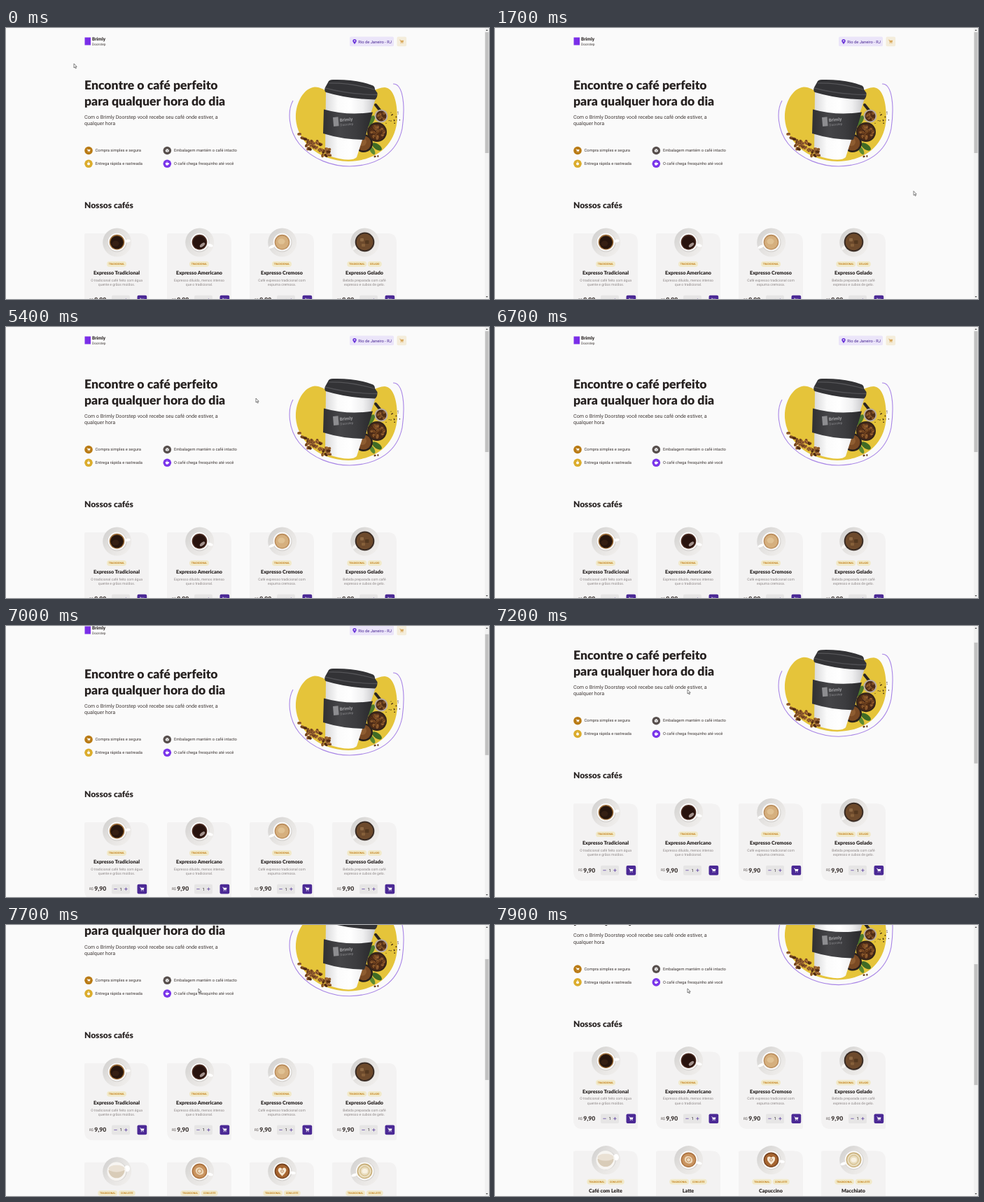
Recreate the animation shown at these times as an HTML page. Size 690 px wide and 388 px high, loop 8000 ms.

```html
<!DOCTYPE html>
<html lang="pt-BR">
<head>
<meta charset="utf-8">
<title>Cafés</title>
<style>
  html, body { margin: 0; width: 100%; height: 100%; overflow: hidden; background: #fafafa; }
  svg { display: block; width: 690px; height: 388px; text-rendering: geometricPrecision; }
  text { font-family: Roboto, sans-serif; }
  .display { font-family: Lato, sans-serif; font-weight: 900; }
  .bold { font-weight: 700; }
  .middle { text-anchor: middle; }
</style>
</head>
<body>
<svg id="stage" viewBox="0 0 690 388"></svg>
<script>
const INK = '#272221', BODY = '#403937', MUTED = '#8d8686',
      DEEP = '#4b2995', GOLD = '#c47f17', SAND = '#f1e9c9', YELLOW = '#e5c43a';

const text = (x, y, size, fill, value, cls = '') =>
  `<text x="${x}" y="${y}" font-size="${size}" fill="${fill}" class="${cls}">${value}</text>`;
const rect = (x, y, w, h, fill, r = 0) =>
  `<rect x="${x}" y="${y}" width="${w}" height="${h}" rx="${r}" fill="${fill}"/>`;
const circle = (x, y, r, fill, extra = '') =>
  `<circle cx="${x}" cy="${y}" r="${r}" fill="${fill}" ${extra}/>`;
const ellipse = (x, y, rx, ry, fill, angle = 0) =>
  `<ellipse rx="${rx}" ry="${ry}" fill="${fill}" transform="translate(${x} ${y}) rotate(${angle})"/>`;
const path = (d, fill, extra = '') => `<path d="${d}" fill="${fill}" ${extra}/>`;
const at = (x, y, content, more = '') => `<g transform="translate(${x} ${y}) ${more}">${content}</g>`;
const gradient = (id, slope, ...colors) =>
  `<linearGradient id="${id}" y2="${slope}">${colors.map((c, i) =>
    `<stop offset="${i / (colors.length - 1)}" stop-color="${c}"/>`).join('')}</linearGradient>`;

let seed = 7;
const random = () => (seed = seed * 16807 % 2147483647) / 2147483647;
const between = (a, b) => a + (b - a) * random();

const cart = (x, y, scale, fill) => at(x, y,
  path('M-3.2-2.8h1.3l.3 1h4.8l-.9 3h-3.6l-1-3.3h-.9z', fill) +
  circle(-1, 2.3, .6, fill) + circle(1.7, 2.3, .6, fill), `scale(${scale})`);

function header() {
  return rect(112.5, 13.5, 8.5, 11, '#7a2ee8') +
    text(123, 18, 6.6, INK, 'Brimly', 'bold') +
    text(123, 24.7, 4.8, BODY, 'Doorstep') +
    rect(491, 12.5, 63, 13.8, '#ebe5f9', 2) +
    path('M498 23.2C496 20.8 495.3 19.8 495.3 18.6a2.7 2.7 0 0 1 5.4 0c0 1.2-.7 2.2-2.7 4.6z', '#6b35d9') +
    circle(498, 18.6, 1, '#ebe5f9') +
    text(503.3, 21.6, 5.75, DEEP, 'Rio de Janeiro - RJ') +
    rect(558.5, 12.5, 13.6, 13.8, '#f4eddb', 2) + cart(565.2, 19.5, .95, '#d9a95c');
}

function benefits() {
  const glyphs = {
    cart: cart(0, 0, .8, '#fff'),
    timer: circle(0, .3, 2, '#fff') + rect(-.8, -2.8, 1.6, .7, '#fff'),
    box: path('M0-2.6L2.4-1.3V1.3L0 2.6-2.4 1.3V-1.3z', '#fff') +
      path('M-2.2-1.2L0 0 2.2-1.2M0 0v2.4', 'none', 'stroke="#574f4d" stroke-width=".5"'),
    mug: path('M-2.4-1.2h4.2v.5h1v1.6h-1.2q-.6 1.5-2 1.5t-2-2z', '#fff') + rect(-1.2, -2.6, 2, .7, '#fff')
  };
  return [
    [118, 175.5, '#b97a14', 'cart', 'Compra simples e segura'],
    [118, 194.3, '#dbac2c', 'timer', 'Entrega rápida e rastreada'],
    [230.3, 175.5, '#574f4d', 'box', 'Embalagem mantém o café intacto'],
    [230.3, 194.3, '#7a35ea', 'mug', 'O café chega fresquinho até você']
  ].map(([x, y, fill, glyph, label]) =>
    circle(x, y, 5.8, fill) + at(x, y, glyphs[glyph]) + text(x + 9.6, y + 1.8, 5.78, BODY, label)).join('');
}

function bean(x, y, size) {
  const fill = ['#5f3518', '#8a5428', '#a96f38'][Math.floor(random() * 3)];
  return at(x, y, ellipse(0, 0, size, size * .7, fill) +
    path(`M${-size * .8} 0Q0 ${size * .4} ${size * .8} 0`, 'none', 'stroke="#2e180b" stroke-width=".6"'),
    `rotate(${between(0, 180)})`);
}

function beansAround(x, y, rx, ry, count, size) {
  let out = '';
  for (let i = 0; i < count; i++) {
    const a = between(0, 2 * Math.PI), r = Math.sqrt(random());
    out += bean(x + rx * r * Math.cos(a), y + ry * r * Math.sin(a), size);
  }
  return out;
}

function hero() {
  let out = gradient('paper', 0, '#d9d9da', '#fbfbfb', '#fff', '#f0f0f1', '#c6c6c9') +
    gradient('sleeve', 0, '#303033', '#454548', '#3c3c3f', '#29292b');
  out += path('M410 104C402 118 403 146 419 166C438 189 467 198 491 198C532 197 559 178 566 144C570 116 568 93 561 84Q558 80 553 80',
    'none', 'stroke="#a885e6" stroke-width="1.1"');
  out += path('M414 130C413 108 425 86 441 84.5C456 84 468 102 490 104C508 104 522 86 541 85C554 86 559 106 559 129C557 166 532 190 489 191C443 190 416 160 414 130z', YELLOW);
  for (let i = 0; i < 14; i++) out += circle(between(543, 564), between(118, 138), between(.4, .9), '#3b2415');
  out += beansAround(529, 183, 5, 3, 3, 1.5);
  // leaves, spoon and bowls
  out += ellipse(521, 133, 9, 4, '#4d7a2c', -55) + ellipse(530, 170, 8, 4, '#3f6b25', 35) +
    ellipse(523, 175, 7, 3, '#5b8a33', 60) +
    path('M528 110L540 125', 'none', 'stroke="#2b2523" stroke-width="4" stroke-linecap="round"') +
    circle(536, 126, 9.5, '#b8aca2') + circle(536, 126, 7.5, '#4c2b18') + beansAround(536, 126, 6, 6, 14, 2) +
    circle(511, 165, 13, '#2b211c') + circle(511, 165, 10.5, '#7a4a24') + circle(509, 163, 6, '#8f5d31') +
    circle(530, 149, 14, '#33241b') + circle(530, 149, 12, '#4a2a18') + beansAround(530, 149, 10, 10, 30, 2.4);
  // cup
  out += path('M457 91L456 178Q457 183 476 187T501 185L528 101z', 'url(#paper)') +
    path('M454 116.5Q488 126 524 120.5L512 160Q482 160 453 151z', 'url(#sleeve)') +
    path('M460 78Q461 74 467 74Q498 73 523 82Q527 83 527 88L530.5 93Q531 100 527 102.5Q490 102 457 92Q454 90 456 85z', '#333336') +
    path('M461 79Q490 78 526 88', 'none', 'stroke="#555558" stroke-width="1.2"') +
    path('M456 86Q490 95 530 95.5', 'none', 'stroke="#505054" stroke-width="1.3"');
  out += at(467, 128, rect(0, 0, 7.5, 13, '#8d8d90') +
    text(9.5, 7, 6.3, '#a4a4a7', 'Brimly', 'bold') + text(9.5, 13.3, 4.6, '#8d8d90', 'Doorstep'), 'rotate(-5)');
  // loose beans in front of the cup
  for (let i = 0; i < 9; i++) out += bean(420 + i * 4 + between(-1, 1), 153 + i * 2.8 + between(-2, 2), 3);
  return out + beansAround(438, 168, 12, 6, 16, 3) + beansAround(456, 178, 9, 6, 14, 3);
}

function tags(cx, y, labels) {
  const widths = { TRADICIONAL: 28, GELADO: 20, 'COM LEITE': 24 };
  let x = cx - (labels.reduce((sum, l) => sum + widths[l], 0) + 1.5 * (labels.length - 1)) / 2;
  return labels.map(label => {
    const w = widths[label];
    const tag = rect(x, y - 3.9, w, 7.8, SAND, 3.9) + text(x + w / 2, y + 1.3, 3.5, GOLD, label, 'bold middle');
    x += w + 1.5;
    return tag;
  }).join('');
}

const plate = circle(.7, 0, 20.5, 'url(#china)') + circle(.7, 0, 13.8, '#d3d1cf');

function cupOf(handleX, handleY, rim, coffee, cream) {
  return plate + ellipse(handleX, handleY, 4.8, 2, '#fff', Math.atan2(handleY, handleX) * 180 / Math.PI) +
    at(.5, -.4, circle(0, 0, 13, '#f9f8f7') + circle(0, 0, 10.8, rim) + circle(0, .2, 9.4, coffee) + cream);
}

const ring = (r, stroke, width) => circle(0, 0, r, 'none', `stroke="${stroke}" stroke-width="${width}"`);
const coffees = [
  ['Expresso Tradicional', ['O tradicional café feito com água', 'quente e grãos moídos.'], ['TRADICIONAL'],
    cupOf(15, -2, '#9a6a35', '#26150d', ellipse(-2, 2, 5, 4, '#351f13'))],
  ['Expresso Americano', ['Expresso diluído, menos intenso', 'que o tradicional.'], ['TRADICIONAL'],
    cupOf(15, 4, '#4a2a20', '#28130e', ellipse(4, 4, 4.4, 2.2, '#a3928d', -40))],
  ['Expresso Cremoso', ['Café expresso tradicional com', 'espuma cremosa.'], ['TRADICIONAL'],
    cupOf(-14, 6, '#b98b5a', '#d5af7e', ellipse(-1, -1, 5, 4, '#e0c193'))],
  ['Expresso Gelado', ['Bebida preparada com café', 'expresso e cubos de gelo.'], ['TRADICIONAL', 'GELADO'],
    plate + ellipse(-13, 7, 5, 2.3, '#f7f5f3', -40) +
    circle(.5, -.6, 13.8, '#3a2c24') + circle(.5, -.6, 11.8, '#6d4a2c') +
    rect(-6, -6, 5, 4.5, '#8f6a45', 1) + rect(1, -3, 5.5, 5, '#54381f', 1) + rect(-4, 2, 5, 4, '#86603a', 1)],
  ['Café com Leite', [], ['TRADICIONAL', 'COM LEITE'],
    plate + ellipse(15, -4, 4, 4.5, '#fff') + circle(0, 0, 13.5, '#f7f5f2') +
    path('M-11.5-2Q0 2 11.5-2A11.5 11.5 0 0 1-11.5-2z', '#d9ccb8') + ellipse(0, -4, 11.5, 5, '#eae1d4')],
  ['Latte', [], ['TRADICIONAL', 'COM LEITE'],
    cupOf(15, 4, '#a96f3b', '#c99460', ellipse(0, 0, 6, 5, '#eed9bb', 30) + ring(3, '#c08b55', 1))],
  ['Capuccino', [], ['TRADICIONAL', 'COM LEITE'],
    cupOf(15, 2, '#74401d', '#a66531', path('M0 7Q-8 0-5-4-2-6 0-3 2-6 5-4 8 0 0 7z', '#f5e7d2') + ring(1.8, '#a66531', .8))],
  ['Macchiato', [], ['TRADICIONAL', 'COM LEITE'],
    cupOf(-14, 5, '#c5aa72', '#e9ddbf', ring(6.5, '#d0b67e', 1) + ellipse(0, 0, 4, 3.3, '#f8f1e1'))]
];

function card([name, lines, labels, cup], index) {
  const x = 112 + index % 4 * 118, y = 294 + Math.floor(index / 4) * 142;
  return at(x, y,
    path('M2 0H79Q92 0 92 13V108Q92 110.5 90 110.5H13Q0 110.5 0 97V2Q0 0 2 0z', '#f3f2f2') +
    at(46, 13, cup) + tags(46, 44, labels) +
    text(46, 59.2, 7.2, INK, name, 'display middle') +
    lines.map((line, i) => text(46, 68.8 + i * 6.4, 5.03, MUTED, line, 'middle')).join('') +
    text(7, 97.3, 5.03, '#574f4d', 'R$') + text(14.2, 98.4, 8.6, BODY, '9,90', 'display') +
    rect(39, 88.8, 26, 13.7, '#e6e5e5', 2) +
    path('M42.3 95.6h4.4M57.2 95.6h4.4M59.4 93.4v4.4', 'none', `stroke="${DEEP}" stroke-width=".7"`) +
    text(52, 97.7, 5.75, INK, '1', 'middle') +
    rect(75.5, 88.8, 13.7, 13.7, DEEP, 2) + cart(82.3, 95.6, 1, '#fff'));
}

const page = gradient('china', .8, '#cfcecd', '#e4e2e0', '#f0eeec') + header() +
  text(112, 88.2, 17.6, INK, 'Encontre o café perfeito', 'display') +
  text(112, 110.5, 17.6, INK, 'para qualquer hora do dia', 'display') +
  text(112, 129.8, 7.19, BODY, 'Com o Brimly Doorstep você recebe seu café onde estiver, a') +
  text(112, 139.1, 7.19, BODY, 'qualquer hora') +
  benefits() + hero() +
  text(112, 258.2, 12, INK, 'Nossos cafés', 'display') +
  coffees.map(card).join('');

const stage = document.getElementById('stage');
stage.innerHTML = rect(0, 0, 690, 388, '#fafafa') + `<g id="page">${page}</g>` +
  rect(684, 0, 6, 388, '#f1f1f1') +
  path('M685.5 4l1.5-2 1.5 2zM685.5 384l1.5 2 1.5-2z', '#505050') +
  `<g id="thumb">${rect(684.5, 6, 5, 173, '#c1c1c1')}</g>` +
  `<g id="cursor">${path('M0 0V6L1.4 4.8 2.4 7 3.4 6.5 2.4 4.4H4.2z', '#fff', 'stroke="#222" stroke-width=".55"')}</g>`;
const [pageLayer, thumb, cursor] = ['page', 'thumb', 'cursor'].map(id => document.getElementById(id));

// Each key: time, then the values reached at that time
const cursorKeys = [
  [600, 97, 51], [800, 150, 74], [1100, 360, 150], [1400, 560, 212], [1500, 587, 224],
  [1700, 598, 233.5], [2200, 602, 245], [3600, 602, 245], [3700, 646, 124.3], [4500, 646, 124.3],
  [4800, 550, 45], [5000, 420, 8], [5200, 325, 45], [5400, 357, 102], [6400, 357, 102], [6700, 275, 91]
];
const scrollKeys = [[6900, 0], [7000, 13], [7500, 80], [7900, 112.4]];

function sample(keys, t) {
  const next = keys.findIndex(key => key[0] > t);
  if (next === 0) return keys[0].slice(1);
  if (next < 0) return keys[keys.length - 1].slice(1);
  const a = keys[next - 1], b = keys[next], k = (t - a[0]) / (b[0] - a[0]);
  return a.slice(1).map((v, i) => v + (b[i + 1] - v) * k);
}

function draw() {
  const t = Math.floor(performance.now() % 8000 / 100) * 100;
  const [scroll] = sample(scrollKeys, t), [x, y] = sample(cursorKeys, t);
  pageLayer.setAttribute('transform', `translate(0 ${-scroll})`);
  thumb.setAttribute('transform', `translate(0 ${scroll * .446})`);
  cursor.setAttribute('transform', `translate(${x} ${y})`);
  // The arrow is lost over the headline until scrolling moves it away
  cursor.setAttribute('visibility', t >= 6700 && t < 7200 ? 'hidden' : 'visible');
  requestAnimationFrame(draw);
}
draw();
</script>
</body>
</html>
```
